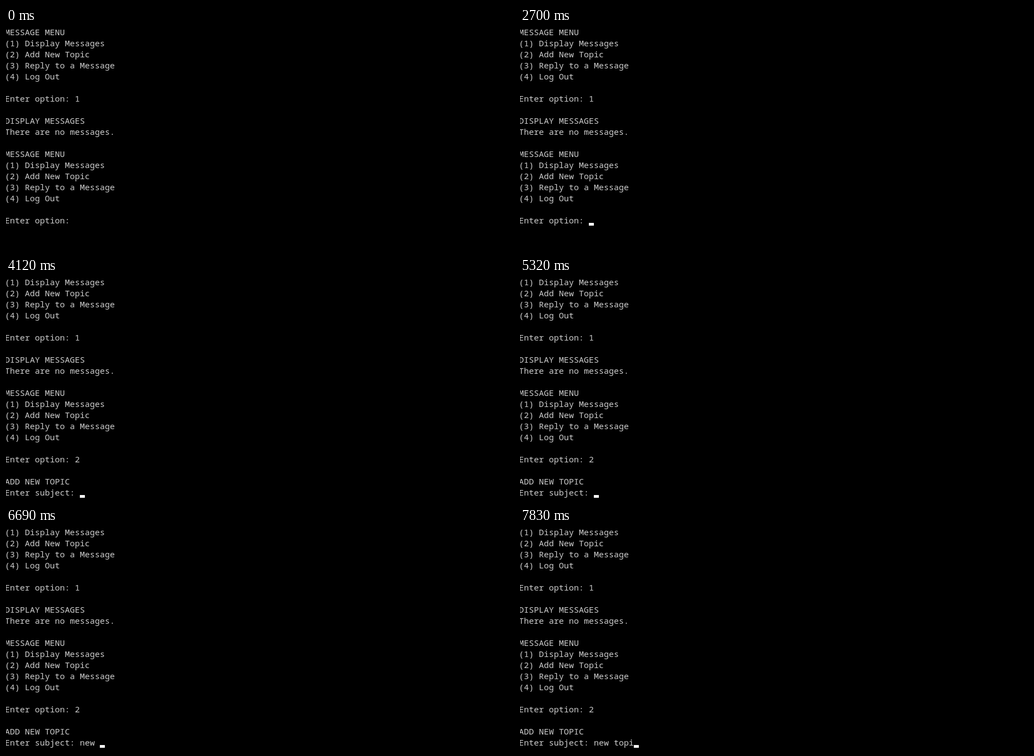
Animation of 915x401 px, one loop 8 s. Source, as an HTML page:

```html
<!DOCTYPE html>
<html lang="en">
<head>
<meta charset="utf-8">
<title>Message menu</title>
<style>
html, body { margin: 0; width: 100%; height: 100%; overflow: hidden; background: #000; }
svg { display: block; }
text {
  font: 15px "Noto Sans Mono", "DejaVu Sans Mono", monospace;
  fill: #ccc;
  white-space: pre;
}
</style>
</head>
<body>
<svg id="stage" width="915" height="401" viewBox="0 0 915 401"></svg>
<script>
const LOOP = 8000, LEFT = -2, CELL = 9, ROW = 20, BASE = 13, ROWS = 20;
const SCROLL = 4120;

const menu = [
  "MESSAGE MENU",
  "(1) Display Messages",
  "(2) Add New Topic",
  "(3) Reply to a Message",
  "(4) Log Out",
  ""
];
const history = [
  ...menu, "Enter option: 1", "",
  "DISPLAY MESSAGES", "There are no messages.", "",
  ...menu
];

// Typed characters: [time, character]
const optionKeys = [[3380, "2"]];
const subjectKeys = [
  [5980, "n"], [6140, "e"], [6210, "w"], [6690, " "],
  [7280, "t"], [7410, "o"], [7570, "p"], [7830, "i"]
];
// The cursor toggles at each of these times, starting hidden
const blinks = [1660, 2170, 2700, 3210, 3380, 4790, 5320, 5830, 5980];

const stage = document.getElementById("stage");
function add(tag, attrs) {
  const el = document.createElementNS("http://www.w3.org/2000/svg", tag);
  for (const k in attrs) el.setAttribute(k, attrs[k]);
  return stage.appendChild(el);
}

const rows = Array.from({ length: ROWS }, (_, i) =>
  add("text", { x: LEFT, y: BASE + i * ROW }));
const cursor = add("rect", { width: CELL, height: 5, fill: "#fff" });

const typed = (keys, t) =>
  keys.filter(k => t >= k[0]).map(k => k[1]).join("");

function screen(t) {
  const lines = [...history, "Enter option: " + typed(optionKeys, t)];
  if (t < SCROLL) return lines;
  return [...lines.slice(1), "", "ADD NEW TOPIC",
    "Enter subject: " + typed(subjectKeys, t)];
}

function render(t) {
  const lines = screen(t), last = lines.length - 1;
  rows.forEach((row, i) => {
    const s = lines[i] || "";
    if (row.textContent !== s) row.textContent = s;
  });
  cursor.setAttribute("x", LEFT + lines[last].length * CELL);
  cursor.setAttribute("y", BASE + last * ROW - 1);
  const on = blinks.filter(b => t >= b).length % 2;
  cursor.setAttribute("visibility", on ? "visible" : "hidden");
}

const start = performance.now();
function tick(now) {
  render(Math.max(0, now - start) % LOOP);
  requestAnimationFrame(tick);
}
render(0);
requestAnimationFrame(tick);
</script>
</body>
</html>
```
